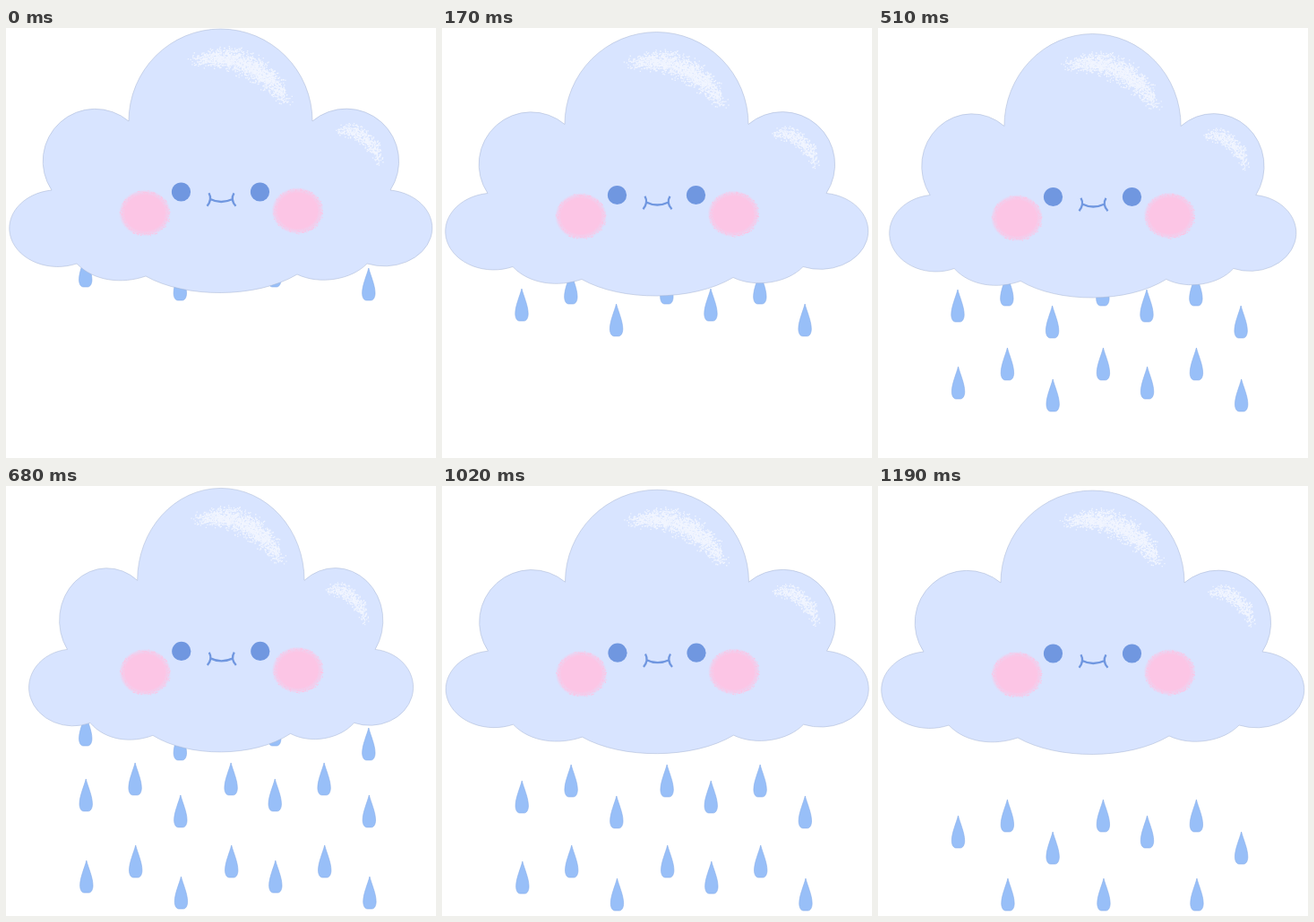
An HTML page for the animation above (1360 ms loop, 480 by 480 pixels).

```html
<!DOCTYPE html>
<html lang="en">
<head>
<meta charset="utf-8">
<title>Rain cloud</title>
<style>
html, body { margin: 0; width: 100%; height: 100%; overflow: hidden; background: #fff; }
svg { display: block; width: 100vw; height: 100vh; }
</style>
</head>
<body>
<svg viewBox="0 0 480 480">
  <defs>
    <radialGradient id="pink">
      <stop offset=".76" stop-color="#fcc5e5"/>
      <stop offset=".9" stop-color="#fcc5e5" stop-opacity=".6"/>
      <stop offset="1" stop-color="#fcc5e5" stop-opacity="0"/>
    </radialGradient>
    <path id="drop" d="M0-36C2-28 7.200-17 7.200-8C7.200-3 5 0 2.500 0H-2.500C-5 0-7.200-3-7.200-8C-7.200-17-2-28 0-36Z"
      fill="#98bff8" stroke="#86ade9" stroke-width=".6"/>
  </defs>
  <g id="rain"></g>
  <g id="cloud">
    <path fill="#d8e4ff" stroke="#a5b3d0" stroke-width=".5" d="M51 181A58.3 58.3 0 0 1 137 104
      A102.5 103 0 0 1 342 104A58.7 58.7 0 0 1 429 181A53.5 42.6 0 1 1 403 263
      C386 281 350 287 325 275C280 302 200 302 156 277
      C130 286 98 283 79 263A54 42.9 0 1 1 51 181Z"/>
    <path id="shine" fill="#f4f8ff" opacity=".9"/>
  </g>
  <g id="face">
    <ellipse cx="155" cy="206.5" rx="29" ry="26" fill="url(#pink)"/>
    <ellipse cx="325.5" cy="204" rx="29" ry="26" fill="url(#pink)"/>
    <path id="fuzz" fill="#fcc5e5"/>
    <g fill="#7097e0">
      <circle cx="195.5" cy="183" r="10.6"/>
      <circle cx="283.5" cy="183" r="10.6"/>
    </g>
    <path d="M226.5 184.3Q230.500 191.5 224.5 198.7M228 191Q240 197 253 191M254.5 184.3Q250 191.5 256.5 198.7"
      fill="none" stroke="#7097e0" stroke-width="2.3"/>
  </g>
</svg>
<script>
const STEP = 170;
const $ = id => document.getElementById(id);

// Columns of drops fall together in three groups.
const columns = [[89, 300], [144, 251, 355], [194.5, 405]];

// Cloud offset and width, then the lower ends of the drops in each group.
const poses = [
  { x: 0, y: 0, w: 1, rain: [[289], [], [304]] },
  { x: 0, y: 3.5, w: 1, rain: [[327], [308], [344]] },
  { x: -0.8, y: 7.2, w: 1, rain: [[297, 369], [351], [311, 387]] },
  { x: 0, y: 5.5, w: 0.962, rain: [[328, 414], [310, 393], [346, 428]] },
  { x: 0.3, y: 1.4, w: 0.909, rain: [[290, 363, 454], [345, 437], [306, 381, 472]] },
  { x: 0, y: 3.7, w: 0.962, rain: [[326, 414], [308, 396, 479], [343, 431]] },
  { x: 0.5, y: 3.2, w: 1, rain: [[365, 455], [347, 437], [382, 474]] },
  { x: 0, y: 4, w: 1, rain: [[404], [386, 474], [422]] }
];

let seed = 7;
const rand = () => (seed = seed * 16807 % 2147483647) / 2147483647;
const dot = (x, y, s) => `M${x.toFixed(1)} ${y.toFixed(1)}h${s}v${s}h-${s}z`;

// Grainy brush stroke along a cubic curve, thinning out at its ends.
function grain(xs, ys, width, count) {
  const at = (p, t) => {
    const u = 1 - t;
    return u * u * u * p[0] + 3 * u * u * t * p[1] + 3 * u * t * t * p[2] + t * t * t * p[3];
  };
  let d = "";
  for (let i = 0; i < count; i++) {
    const t = 0.75 * rand() + 0.25 * rand();
    const off = (rand() + rand() + rand() - 1.5) * width * (0.55 + 0.45 * Math.sin(Math.PI * t));
    const dx = at(xs, t + 0.01) - at(xs, t), dy = at(ys, t + 0.01) - at(ys, t);
    const len = Math.hypot(dx, dy);
    d += dot(at(xs, t) - dy / len * off, at(ys, t) + dx / len * off, 1.3);
  }
  return d;
}

function rim(cx, cy, count) {
  let d = "";
  for (let i = 0; i < count; i++) {
    const a = rand() * 2 * Math.PI, r = 0.84 + 0.14 * rand();
    d += dot(cx + 29 * r * Math.cos(a), cy + 26 * r * Math.sin(a), 1);
  }
  return d;
}

$("shine").setAttribute("d",
  grain([204, 248, 293, 315], [39, 21, 44, 86], 12, 1700) +
  grain([367, 391, 412, 418], [116, 106, 126, 155], 8, 480));
$("fuzz").setAttribute("d", rim(155, 206.5, 170) + rim(325.5, 204, 170));

const drops = columns.map(group => group.map(x => [0, 1, 2].map(() => {
  const el = document.createElementNS("http://www.w3.org/2000/svg", "use");
  el.setAttribute("href", "#drop");
  $("rain").append(el);
  return { el, x };
})));

function draw(pose) {
  const { x, y, w, rain } = pose;
  $("cloud").setAttribute("transform", `translate(${240 + x} ${y}) scale(${w} 1) translate(-240 0)`);
  $("face").setAttribute("transform", `translate(${x} ${y})`);
  drops.forEach((group, g) => group.forEach(column => column.forEach((drop, i) => {
    const end = rain[g][i];
    drop.el.setAttribute("visibility", end ? "visible" : "hidden");
    // Drops drift slightly to the right as they fall.
    if (end) drop.el.setAttribute("transform", `translate(${drop.x + (end - 330) / 150} ${end})`);
  })));
}

const start = performance.now();
let shown = -1;
function tick() {
  const now = Math.floor((performance.now() - start) / STEP) % poses.length;
  if (now !== shown) draw(poses[shown = now]);
  requestAnimationFrame(tick);
}
tick();
</script>
</body>
</html>
```
